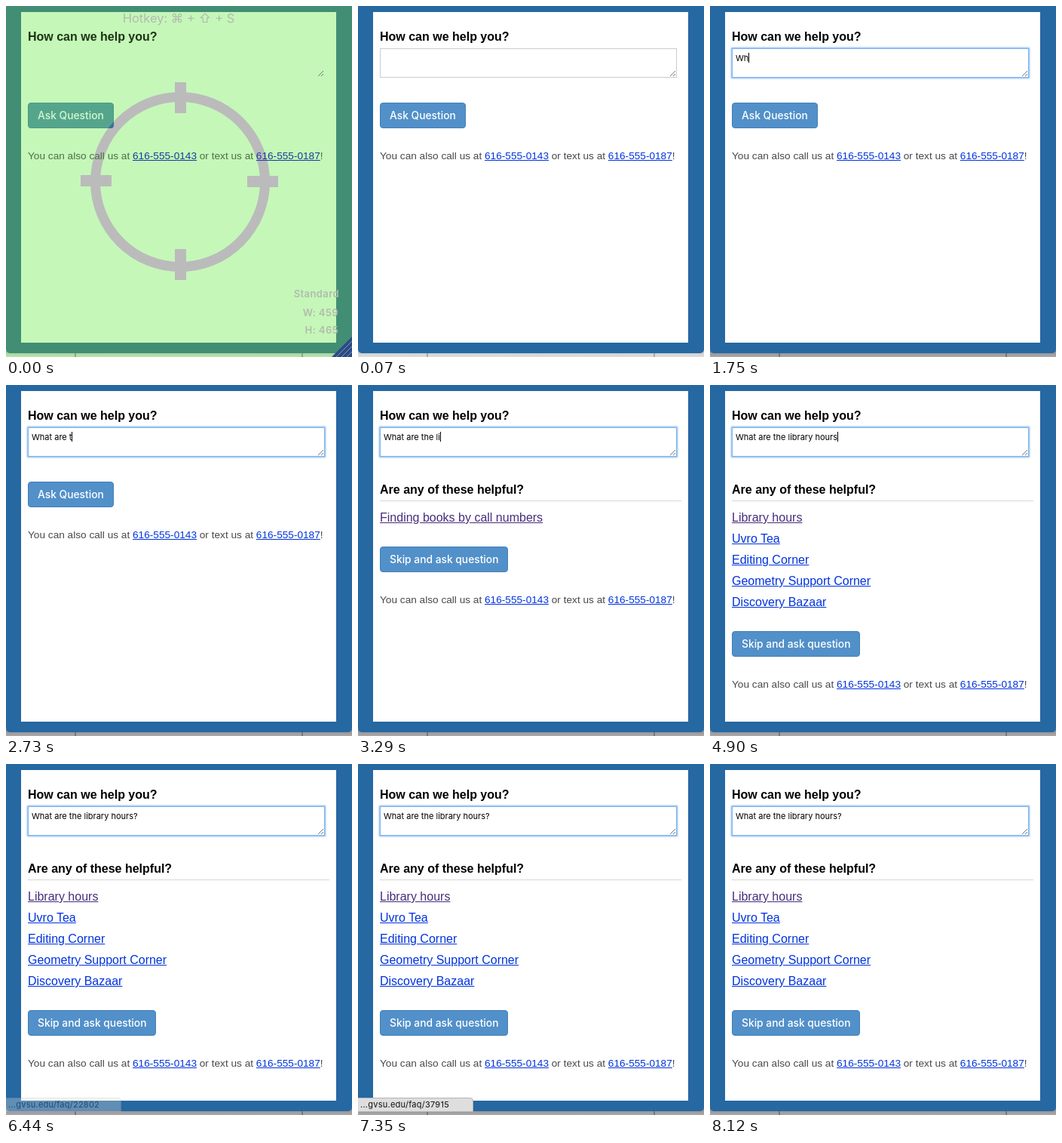
An HTML page for the animation above (8.61 s loop, 459x465 px).

```html
<!DOCTYPE html>
<html lang="en">
<head>
<meta charset="utf-8">
<title>Help form</title>
<style>
  html, body { margin: 0; width: 100%; height: 100%; overflow: hidden; }
  #stage {
    --frame: #2668a2; --panel: #fff; --head: #000; --ink: #484848; --link: #0033dd;
    --button: #5290c9; --edge: #437fba; --label: #fff; --box: #ccc;
    --strip: linear-gradient(#c4c4c4, #dedede); --rule: #aaa;
    position: relative; width: 459px; height: 465px; overflow: hidden;
    background: var(--panel); color: var(--head);
    font: 16px/21px "Liberation Sans", Arial, sans-serif;
  }
  #stage.active { --strip: linear-gradient(#8c8c90, #aaa8aa); --rule: #777; }
  #stage.flash {
    --frame: #418e74; --panel: #c5f7b9; --head: #1d3413; --ink: #4d6f45; --link: #123f9c;
    --button: #55a58c; --edge: #4a9a80; --label: #d3f8d0; --box: transparent;
    --strip: linear-gradient(#9fc99a, #b8e2ae); --rule: #8aa886;
  }
  #stage div, #stage svg { position: absolute; box-sizing: border-box; white-space: pre; }
  #strip { left: 0; top: 456px; width: 459px; height: 9px; background: var(--strip); }
  .post { top: 4px; width: 2px; height: 5px; background: var(--rule); }
  #frame { left: 0; top: 0; width: 459px; height: 460px; background: var(--frame); border-radius: 0 0 5px 5px; }
  #panel { left: 20px; top: 8px; width: 418px; height: 438px; background: var(--panel); }
  .head { left: 29px; font-weight: bold; }
  #box { left: 29px; top: 56px; width: 394px; height: 39px; border: 1px solid var(--box); }
  .active #box { border-color: #7db3ee; box-shadow: 0 0 2px 1px #7db5f2; }
  #entry { left: 34px; top: 62px; height: 13px; color: #000; font: 11px/15px Inter, sans-serif; }
  #caret { display: inline-block; width: 1px; height: 13px; background: #000; vertical-align: top; }
  #grip { left: 413px; top: 85px; }
  #rule { left: 29px; top: 153px; width: 400px; height: 1px; background: #d8d8d8; }
  #links { left: 29px; top: 162px; line-height: 28px; }
  u { color: var(--link); }
  u.seen { color: #472c7e; }
  #button {
    left: 29px; height: 34px; padding: 0 12px; border: 1px solid var(--edge); border-radius: 4px;
    background: var(--button); color: var(--label); font: 500 13.8px/32px Inter, sans-serif;
  }
  #phone { left: 29px; color: var(--ink); font-size: 13.65px; line-height: 20px; }
  #status {
    left: -1px; top: 442px; width: 154px; height: 19px; padding-left: 3px;
    border: 1px solid #b4b4b4; border-radius: 0 4px 0 0; background: #dedede;
    color: #111; font: 11px/17px Inter, sans-serif; letter-spacing: .25px;
  }
  #target, #notes { left: 0; top: 0; }
  #stage:not(.flash) :is(#target, #notes), #stage:not(.active) #status { display: none; }
  #notes text { fill: #b2bbae; }
</style>
</head>
<body>
<div id="stage">
  <div id="strip"><div class="post" style="left:91px"></div><div class="post" style="left:392px"></div></div>
  <div id="frame"></div>
  <div id="panel"></div>
  <svg id="target" width="459" height="465">
    <g fill="none" stroke="#bbb">
      <circle cx="231" cy="233" r="112.5" stroke-width="13"/>
      <path stroke-width="15" d="M231.5 101v41M231.5 322v41M99 231.5h41M320 232.5h41"/>
    </g>
  </svg>
  <div class="head" style="top:30px">How can we help you?</div>
  <div id="box"></div>
  <svg id="grip" width="9" height="9"><path d="M1 8l7-7M5 8l3-3" stroke="#777" fill="none"/></svg>
  <div id="entry"><span id="typed"></span><span id="caret"></span></div>
  <div id="helpful">
    <div class="head" style="top:128px">Are any of these helpful?</div>
    <div id="rule"></div>
    <div id="links"></div>
  </div>
  <div id="button"></div>
  <div id="phone">You can also call us at <u>616-555-0143</u> or text us at <u>616-555-0187</u>!</div>
  <div id="status"></div>
  <svg id="notes" width="459" height="465">
    <clipPath id="corner"><rect x="30" y="129" width="113" height="33" rx="4"/></clipPath>
    <circle cx="231" cy="233" r="112.5" fill="none" stroke="#3f6f98" stroke-width="13" clip-path="url(#corner)"/>
    <text x="229" y="22" text-anchor="middle" font-size="16.5" font-family="Inter, DejaVu Sans, sans-serif">Hotkey: ⌘ + ⇧ + S</text>
    <g font-family="Inter, sans-serif" font-size="13" font-weight="600" letter-spacing=".4" text-anchor="end">
      <text x="442" y="386">Standard</text>
      <text x="441" y="411">W: 459</text>
      <text x="441" y="434">H: 465</text>
    </g>
    <path d="M432 465L459 438V465Z" fill="#2d4a86"/>
    <path d="M438 465l21-21M445 465l14-14M452 465l7-7" stroke="#7c9fae"/>
  </svg>
</div>
<script>
const LOOP = 8610;
const QUESTION = "What are the library hours?";
// One time per typed character.
const KEYS = [
  1680, 1750, 1820, 1960, 2100, 2240, 2380, 2450,
  2520, 2660, 2800, 2870, 3010, 3150, 3290, 3360, 3500,
  3710, 3850, 4060, 4270, 4410, 4480, 4620, 4690, 4760, 5110
];
const BOOKS = "Finding books by call numbers";
const HOURS = "Library hours";
const SEEN = [BOOKS, HOURS];
const ANSWERS = [
  [0, []],
  [2800, [BOOKS]],
  [3500, ["Off-campus delivery of books", BOOKS]],
  [4480, [HOURS, "Uvro Tea", "Editing Corner", "Geometry Support Corner", "Discovery Bazaar"]]
];
const CARET = [[0, 0], [420, 1], [980, 0], [1470, 1], [6020, 0], [6510, 1], [7070, 0], [7630, 1], [8120, 0]];
const STATUS = [[0, 0], [6440, .32], [6510, .65], [6580, 1], [7630, .75], [7700, .5], [7770, .25], [7840, 0]];
const PAGE = [[0, 22802], [7350, 37915]];

const el = id => document.getElementById(id);
const at = (steps, t) => steps.findLast(([start]) => start <= t)[1];
let shownLinks;

function showLinks(links) {
  if (links === shownLinks) return;
  shownLinks = links;
  el("links").innerHTML = links.map(s => `<u class="${SEEN.includes(s) ? "seen" : ""}">${s}</u>`).join("\n");
  const top = links.length ? 186 + 28 * links.length : 128;
  el("helpful").style.display = links.length ? "" : "none";
  el("button").textContent = links.length ? "Skip and ask question" : "Ask Question";
  el("button").style.top = top + "px";
  el("phone").style.top = top + 61 + "px";
}

function draw(t) {
  el("stage").className = t < 70 ? "flash" : t < 420 ? "" : "active";
  el("typed").textContent = QUESTION.slice(0, KEYS.filter(k => k <= t).length);
  el("caret").style.opacity = at(CARET, t);
  el("status").style.opacity = at(STATUS, t);
  el("status").textContent = "...gvsu.edu/faq/" + at(PAGE, t);
  showLinks(at(ANSWERS, t));
}

const start = performance.now();
function tick() {
  draw((performance.now() - start) % LOOP);
  requestAnimationFrame(tick);
}
tick();
</script>
</body>
</html>
```
